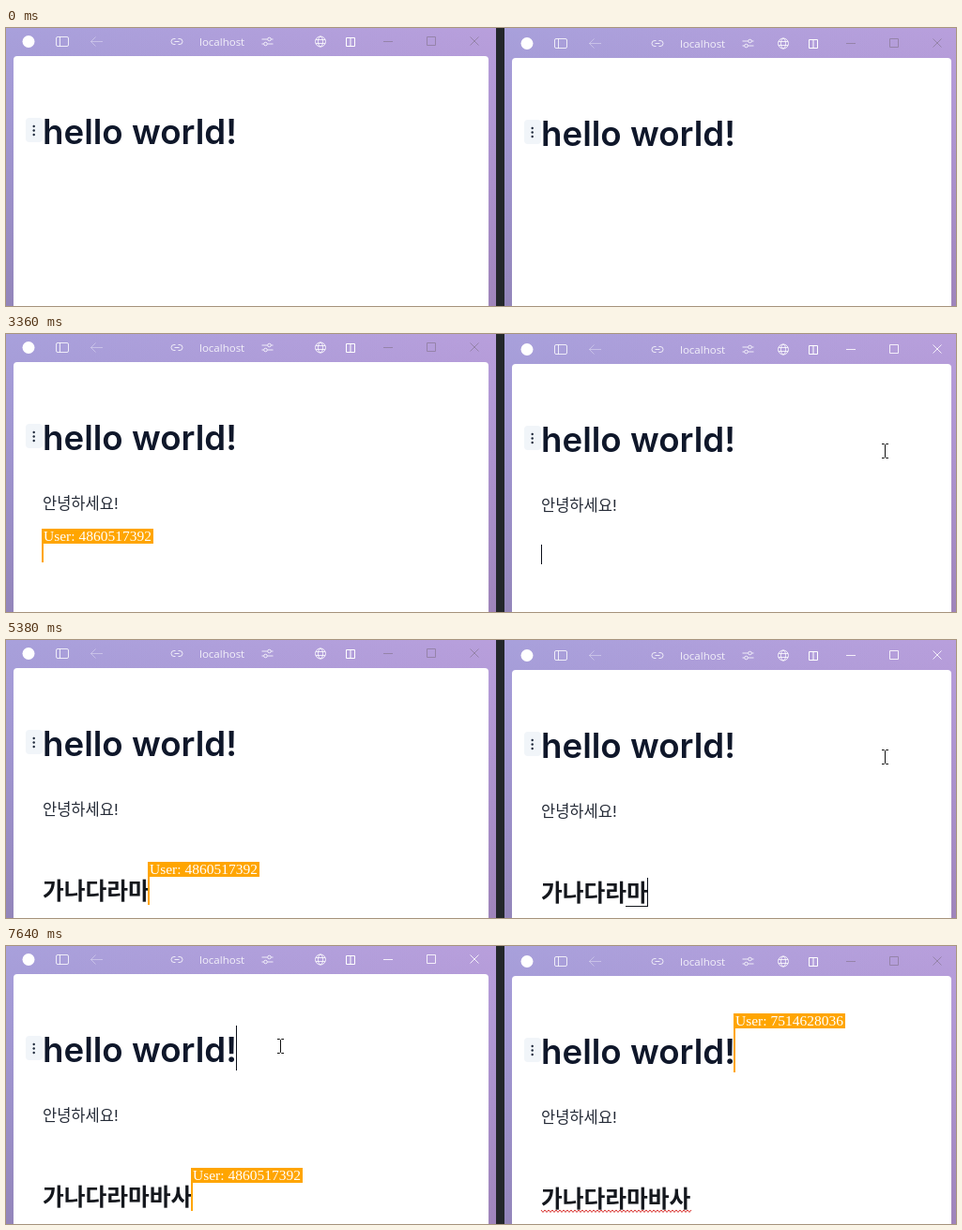
An HTML page that plays this animation: 1012x297 px, repeating every 8 s.

```html
<!DOCTYPE html>
<html lang="ko">
<head>
<meta charset="utf-8">
<title>Two editors, one document</title>
<style>
  html, body { margin: 0; width: 100%; height: 100%; overflow: hidden; background: #23272b; }
  svg { display: block; width: 1012px; height: 297px; }
  text { white-space: pre; font-family: Inter, "Noto Sans CJK KR", "Noto Sans CJK", sans-serif; font-optical-sizing: none; }
  .h1 { font-size: 36.7px; font-weight: 600; fill: #0f172a; }
  .p { font-size: 16.5px; fill: #242a36; }
  .h2 { font-size: 24.75px; font-weight: 700; fill: #14171d; }
  .user { font: 15.5px "Liberation Serif", serif; fill: #fff; }
  .url { font: 11.5px "Open Sans", "Noto Sans", sans-serif; fill: #fff; fill-opacity: .85; }
  .icon { fill: none; stroke: #fff; stroke-opacity: .8; }
  .ctl { fill: none; stroke: #9583a9; }
  .ctl.on { stroke: #f4effa; }
</style>
</head>
<body>
<svg id="stage" viewBox="0 0 1012 297">
  <defs>
    <linearGradient id="hue"><stop stop-color="#a8a0db"/><stop offset="1" stop-color="#b89fdc"/></linearGradient>
    <linearGradient id="shade" x2="0" y2="1"><stop stop-color="#503070" stop-opacity="0"/><stop offset="1" stop-color="#503050" stop-opacity=".24"/></linearGradient>
  </defs>
</svg>
<script>
const LOOP = 8000, LEFT = 39;
const stage = document.getElementById('stage');

// One entry per text line: label top, caret top, caret bottom, baseline, style
const LINES = [
  { label: 70, top: 85, bottom: 133, base: 124, style: 'h1' },
  { label: 155, top: 170, bottom: 191, base: 186.5, style: 'p' },
  { label: 208, top: 223, bottom: 244, base: 239.5, style: 'p' },
  { label: 237, top: 252, bottom: 283, base: 277, style: 'h2' }
];

// [time, line, text, still composing]
const edits = [[0, 0, 'hello world!'], [1340, 1, '']];
const type = (line, times, words) =>
  words.split(' ').forEach((word, i) => edits.push([times[i], line, word, true]));
type(1, [1810, 1880, 2010, 2080, 2150, 2280], 'ㅇ 아 안 안ㄴ 안녀 안녕');
type(1, [2480, 2550, 2620, 2690, 2760, 2830], '안녕ㅎ 안녕하 안녕핫 안녕하세 안녕하셍 안녕하세요');
edits.push([3090, 1, '안녕하세요!'], [3360, 2, ''], [3890, 2, '#'], [4090, 2, '##'], [4360, 2, ''], [4360, 3, '']);
type(3, [4700, 4770, 4830, 4900, 4970, 5040, 5110, 5240, 5310, 5380, 5450, 5580, 5840, 5910],
  'ㄱ 가 간 가나 가낟 가나다 가나달 가나다라 가나다람 가나다라마 가나다라맙 가나다라마바 가나다라마밧 가나다라마바사');
edits.push([6900, 3, '가나다라마바사']);

// [time, x, y]; no position means hidden
const pointerPath = [
  [0], [200, 995, 185], [270, 950, 141], [340, 936.5, 125],
  [6700, 956, 96], [6770, 983, 61],
  [7160, 760, 80], [7230, 470, 112], [7300, 330, 110], [7360, 292.5, 107]
];

const within = (t, ...spans) => spans.some(([from, to]) => t >= from && t < to);
const show = (node, on) => node.setAttribute('visibility', on ? 'visible' : 'hidden');
const set = (node, attrs) => { for (const k in attrs) node.setAttribute(k, attrs[k]); };

function add(parent, markup) {
  const g = document.createElementNS('http://www.w3.org/2000/svg', 'g');
  g.innerHTML = markup;
  parent.append(g);
  return g;
}

function makeWindow(x, y, width, card, mid, right, user) {
  const wave = Array.from({ length: 81 }, (_, i) => `${LEFT + i * 2},${i % 2 ? 282.5 : 280}`).join(' ');
  const g = add(stage, `
    <rect width="${width}" height="300" y="${-y}" fill="url(#hue)"/>
    <rect width="${width}" height="300" y="${-y}" fill="url(#shade)"/>
    <path d="M8 300V34q0-4 4-4H${card - 4}q4 0 4 4V300z" fill="#fff"/>
    <circle cx="24" cy="14.5" r="6.5" fill="#fff"/>
    <g class="icon">
      <rect x="53.5" y="9.5" width="13" height="10" rx="1.5"/><path d="M57.5 9.5v10"/>
      <path d="M103 14.5H90.5m5-5l-5 5l5 5" stroke-opacity=".35"/>
    </g>
    <g transform="translate(${mid})">
      <path class="icon" d="M180.500 11.500h-1.500a3 3 0 0 0 0 6h1.500m3-6h1.500a3 3 0 0 1 0 6h-1.500M179.500 14.500h5"/>
      <text class="url" x="206" y="19">localhost</text>
      <g class="icon"><path d="M272.500 12h6m4 0h2m-12 5h2m4 0h6"/><circle cx="280.500" cy="12" r="1.800"/><circle cx="276.500" cy="17" r="1.800"/></g>
    </g>
    <g transform="translate(${right})">
      <g class="icon"><circle cx="335" cy="14.500" r="5.500"/><ellipse cx="335" cy="14.500" rx="2.500" ry="5.500"/><path d="M330 12.500h10m-10 4h10"/></g>
      <path class="icon" style="stroke-opacity:1" d="M362.500 10.500h9v9h-9zM367 10.500v9"/>
      <path class="ctl" d="M402 14.500h10M448.500 9.500h9v9h-9zM494.500 9.500l9 9m0-9l-9 9"/>
    </g>
    <rect x="21" y="96" width="18" height="26" rx="4" fill="#f1f5f9"/>
    <g fill="#1e293b"><circle cx="29.700" cy="105" r="1.200"/><circle cx="29.700" cy="109.500" r="1.200"/><circle cx="29.700" cy="114" r="1.200"/></g>
    ${LINES.map(l => `<text class="${l.style} line" x="${LEFT}" y="${l.base}"></text>`).join('')}
    <rect class="under" height="1" fill="#14171d"/>
    <polyline class="wave" points="${wave}" fill="none" stroke="#d9302c"/>
    <rect class="caret" width="1" fill="#0b0f19"/>
    <g class="remote">
      <rect width="119" height="16" fill="#ffa500"/>
      <rect class="stem" y="16" width="2" fill="#ffa500"/>
      <text class="user" x="2" y="13">User: ${user}</text>
    </g>`);
  g.setAttribute('transform', `translate(${x} ${y})`);
  const find = name => g.querySelector('.' + name);
  return {
    lines: [...g.querySelectorAll('.line')], ctl: find('ctl'), under: find('under'),
    wave: find('wave'), caret: find('caret'), remote: find('remote'), stem: find('stem')
  };
}

const a = makeWindow(0, 0, 522, 514, 0, 0, '4860517392');
const b = makeWindow(531, 2, 481, 476, -19, -38, '7514628036');
const pointer = add(stage, '<path d="M-3.500-7.500h2.500l1 1l1-1h2.500M-3.500 7.500h2.500l1-1l1 1h2.500M0-6.500v13" fill="none" stroke="#111"/>');

const lineEnd = (win, line) =>
  Math.floor(LEFT + (win.lines[line].textContent ? win.lines[line].getComputedTextLength() : 0));

function placeCaret(win, line) {
  const { top, bottom } = LINES[line];
  set(win.caret, { x: lineEnd(win, line), y: top, height: bottom - top });
}

function placeRemote(win, line) {
  const { label, bottom } = LINES[line];
  set(win.remote, { transform: `translate(${lineEnd(win, line) - 1} ${label})` });
  set(win.stem, { height: bottom - label - 16 });
}

function draw(t) {
  const texts = ['', '', '', ''];
  let line = 0, composing = false;
  for (const [time, row, text, open] of edits) {
    if (time > t) break;
    texts[row] = text;
    line = row;
    composing = !!open;
  }
  for (const win of [a, b]) {
    win.lines.forEach((node, i) => { if (node.textContent !== texts[i]) node.textContent = texts[i]; });
    show(win.under, win === b && composing);
    show(win.wave, win === b && t >= 6900);
  }
  if (composing) {
    const node = b.lines[line], last = node.getSubStringLength(texts[line].length - 1, 1);
    set(b.under, { x: Math.round(lineEnd(b, line) - last), y: LINES[line].bottom - 1 - (line === 1), width: Math.round(last) });
  }

  a.ctl.classList.toggle('on', t >= 7430);
  b.ctl.classList.toggle('on', within(t, [540, 7430]));

  placeCaret(a, 0);
  show(a.caret, t >= 7500);
  placeRemote(a, line);
  show(a.remote, t >= 610);

  placeCaret(b, line);
  show(b.caret, within(t, [610, 1070], [1340, 6370], [6900, 7430]));
  placeRemote(b, 0);
  show(b.remote, t >= 7640);

  const [, x, y] = pointerPath.filter(p => p[0] <= t).pop();
  show(pointer, x !== undefined);
  if (x !== undefined) set(pointer, { transform: `translate(${x} ${y})` });
}

const start = performance.now();
function tick() {
  draw((performance.now() - start) % LOOP);
  requestAnimationFrame(tick);
}
tick();
</script>
</body>
</html>
```
